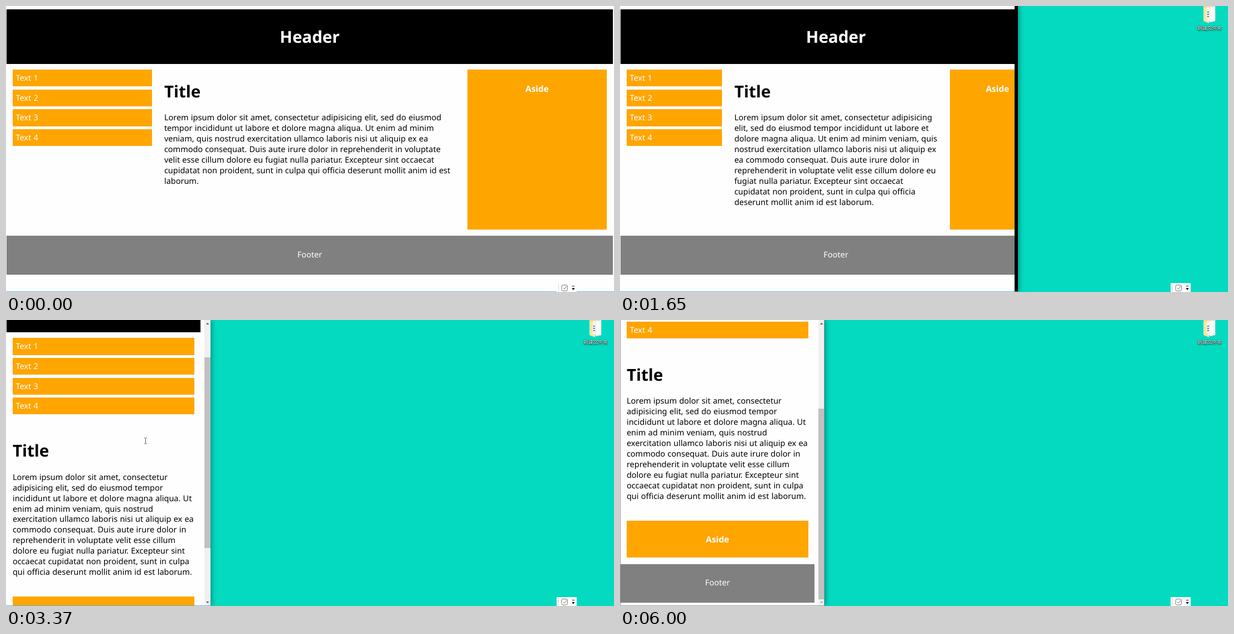
Animation of 1091x513 px, one loop 6.09 s. Source, as an HTML page:

```html
<!DOCTYPE html>
<html lang="en">
<head>
<meta charset="utf-8">
<title>Responsive layout</title>
<style>
* { box-sizing: border-box; }
html, body { margin: 0; width: 100%; height: 100%; overflow: hidden; }
body {
  position: relative;
  background: #03dac0;
  font: 14.49px/18.96px "Noto Sans", "Open Sans", sans-serif;
  word-spacing: .45px;
  text-rendering: geometricPrecision;
}
h1, h4, p, ul { margin: 0; padding: 0; }
h1 { font-size: 29.5px; line-height: 38px; }

#win {
  position: absolute; left: 0; top: 0; height: 513px;
  background: #fefefe;
  box-shadow: 1px 0 9px rgba(0, 0, 0, .45);
  overflow: hidden;
}
#win::after { content: ""; position: absolute; left: 0; right: 0; bottom: 0; height: 1px; background: #5fb0de; }
#win.idle::after { top: 0; height: auto; background: none; border: solid #8f9a9a; border-width: 0 1px 1px; }
#strip { position: absolute; right: 0; top: 0; width: 6px; height: 513px; background: #000; }

#page { position: absolute; left: 1px; top: 6px; color: #000; }
header, footer, aside div { display: flex; align-items: center; justify-content: center; color: #fff; }
header { height: 98px; background: #000; }
footer { height: 69.4px; background: gray; }
.row { display: flex; align-items: flex-start; min-height: 308px; }
nav, aside { width: 25%; padding: 10.2px 10.9px 11.1px; }
li { list-style: none; height: 30.3px; margin-bottom: 5.25px; padding-left: 5.5px; line-height: 31px; background: orange; color: #fff; }
main { width: 50%; padding: 29.6px 10.9px 22.9px; }
main p { margin: 20.3px -2px 0 0; }
aside div { height: 287px; padding-top: 24.4px; align-items: flex-start; background: orange; }
h4 { font-size: 15.4px; line-height: 19px; }

.narrow .row { display: block; min-height: 0; }
.narrow nav, .narrow main, .narrow aside { width: 100%; }
.narrow aside div { height: 66.5px; }

#bar { position: absolute; right: 0; top: 0; width: 11.5px; height: 513px; background: #f0f0f0; display: none; }
.narrow #bar { display: block; }
#thumb { position: absolute; left: .5px; width: 10.5px; height: 342px; background: #c1c1c1; }
#bar svg { position: absolute; left: 0; top: 0; }

#desk, #cursor { position: absolute; left: 0; top: 0; }
#label {
  position: absolute; left: 1028px; top: 33px; width: 60px;
  font: 8.7px/13px "Noto Sans CJK SC", "Noto Sans CJK", sans-serif;
  text-align: center; color: #fff; text-shadow: 0 1px 1px #000, 0 0 2px #000;
}
</style>
</head>
<body>
<div id="label">新建文件夹</div>
<svg id="desk" width="1091" height="40">
  <path d="M1047 0H1064V28L1047 26Z" fill="#f3d98b"/>
  <path d="M1053 2L1062 1V27H1053Z" fill="#f4f6f4"/>
  <path d="M1058 2L1068 0V27L1058 29Z" fill="#fafbfa" stroke="#d5dcda" stroke-width=".6"/>
  <path d="M1054 11H1056.5M1054 15H1056.5M1054 19H1056.5" stroke="#3d6c8c" stroke-width="2"/>
  <path d="M1047 1L1053 4V25L1057 27V31L1047 27Z" fill="#fbe5a4"/>
</svg>

<div id="win">
  <div id="page">
    <header><h1>Header</h1></header>
    <div class="row">
      <nav><ul><li>Text 1</li><li>Text 2</li><li>Text 3</li><li>Text 4</li></ul></nav>
      <main>
        <h1>Title</h1>
        <p>Lorem ipsum dolor sit amet, consectetur adipisicing elit, sed do eiusmod tempor incididunt ut labore et dolore magna aliqua. Ut enim ad minim veniam, quis nostrud exercitation ullamco laboris nisi ut aliquip ex ea commodo consequat. Duis aute irure dolor in reprehenderit in voluptate velit esse cillum dolore eu fugiat nulla pariatur. Excepteur sint occaecat cupidatat non proident, sunt in culpa qui officia deserunt mollit anim id est laborum.</p>
      </main>
      <aside><div><h4>Aside</h4></div></aside>
    </div>
    <footer>Footer</footer>
  </div>
  <div id="bar">
    <div id="thumb"></div>
    <svg width="12" height="513">
      <path id="up" d="M3 8L5.7 5L8.4 8Z"/>
      <path id="down" d="M3 505L5.7 508L8.4 505Z"/>
    </svg>
  </div>
  <div id="strip"></div>
</div>

<svg style="position:absolute;left:988px;top:497px" width="36" height="16">
  <path d="M0 0H36V16H0Z" fill="#fdfdfd"/>
  <path d="M3.5 2V15" stroke="#aaa" stroke-dasharray="1 1.5"/>
  <rect x="9" y="3.5" width="10.5" height="10.5" rx="2.5" fill="none" stroke="#777"/>
  <path d="M12 9L14 11L18 5.5" fill="none" stroke="#777"/>
  <path d="M28 5.5H32M28 9.5H32L30 12Z" stroke="#111" fill="#111"/>
</svg>

<svg id="cursor" width="12" height="14" style="overflow:visible">
  <path id="arrow" d="M0 0V9L2 7.2L3.5 10.4L5 9.7L3.7 6.6H6.3Z" fill="#fff" stroke="#111" stroke-width=".6"/>
  <path id="beam" d="M-2 .5H-.5L.5 1.2L1.5 .5H3M.5 1V10.5M-2 11H-.5L.5 10.3L1.5 11H3" fill="none" stroke="#333" stroke-width=".8"/>
</svg>

<script>
const LOOP = 6090, MAX_SCROLL = 218;
const $ = id => document.getElementById(id);
const show = (el, on) => { el.style.display = on ? "" : "none"; };

// Bursts of motion: start, end, number of steps
const bursts = [
  [110, 700, 9], [840, 1350, 8], [1460, 1960, 7], [2070, 2520, 8], [2910, 3060, 3],
  [3210, 3750, 8], [3920, 4450, 8], [4530, 4830, 5], [5070, 5300, 4]
];
const edgeKeys = [
  [40, 1093], [552.5, 1027], [700, 988], [1350, 772], [1627, 714],
  [1960, 449], [2134, 409], [2199, 409], [2520, 367]
];
const scrollKeys = [[3133, 0], [3750, MAX_SCROLL]];
const cursorKeys = [
  [2910, 276, 94], [3060, 250, 211], [3920, 250, 211], [4450, 902, 381],
  [4530, 905, 383], [4830, 933, 514], [5070, 963, 508], [5224, 1001, 499], [5300, 1003, 514]
];
// The page repaints later than the window edge moves
const repaints = [[560, 1022], [840, 958], [1050, 876], [1460, 773]];

function snap(t) {
  let held = 0;
  for (const [start, end, n] of bursts) {
    if (t < start) break;
    const step = (end - start) / (n - 1);
    held = Math.min(end, start + Math.floor((t - start) / step + 1e-6) * step);
  }
  return held;
}

function at(keys, t, col = 1) {
  const i = keys.findIndex(k => k[0] >= t);
  if (i === 0) return keys[0][col];
  if (i < 0) return keys[keys.length - 1][col];
  const a = keys[i - 1], b = keys[i];
  return a[col] + (b[col] - a[col]) * (t - a[0]) / (b[0] - a[0]);
}

function pageWidth(t, edge, narrow) {
  if (narrow) return edge - 19;
  if (t >= 2070) return edge - 1;
  const done = repaints.filter(r => r[0] <= t).pop();
  return done ? done[1] : edge - 5;
}

function draw(time) {
  const t = snap(time);
  const edge = at(edgeKeys, t);
  const narrow = t >= 2260;
  const width = pageWidth(t, edge, narrow);
  const scroll = at(scrollKeys, t);
  const win = $("win");

  win.style.width = edge + "px";
  win.classList.toggle("narrow", narrow);
  win.classList.toggle("idle", time >= 6000);
  $("page").style.width = width + "px";
  $("page").style.top = 6 - scroll + "px";
  show($("strip"), width > edge);

  $("thumb").style.top = 12 + scroll / MAX_SCROLL * 146.5 + "px";
  $("up").style.fill = scroll > 0 ? "#505050" : "#a3a3a3";
  $("down").style.fill = scroll < MAX_SCROLL ? "#505050" : "#a3a3a3";

  const x = at(cursorKeys, t, 1), y = at(cursorKeys, t, 2);
  const overText = t >= 3060 && x < 340;
  show($("cursor"), t >= 2910 && time < 6000);
  show($("arrow"), !overText);
  show($("beam"), overText);
  $("cursor").style.transform = `translate(${x}px, ${y}px)`;
}

const begin = performance.now();
function tick() {
  draw((performance.now() - begin) % LOOP);
  requestAnimationFrame(tick);
}
tick();
</script>
</body>
</html>
```
